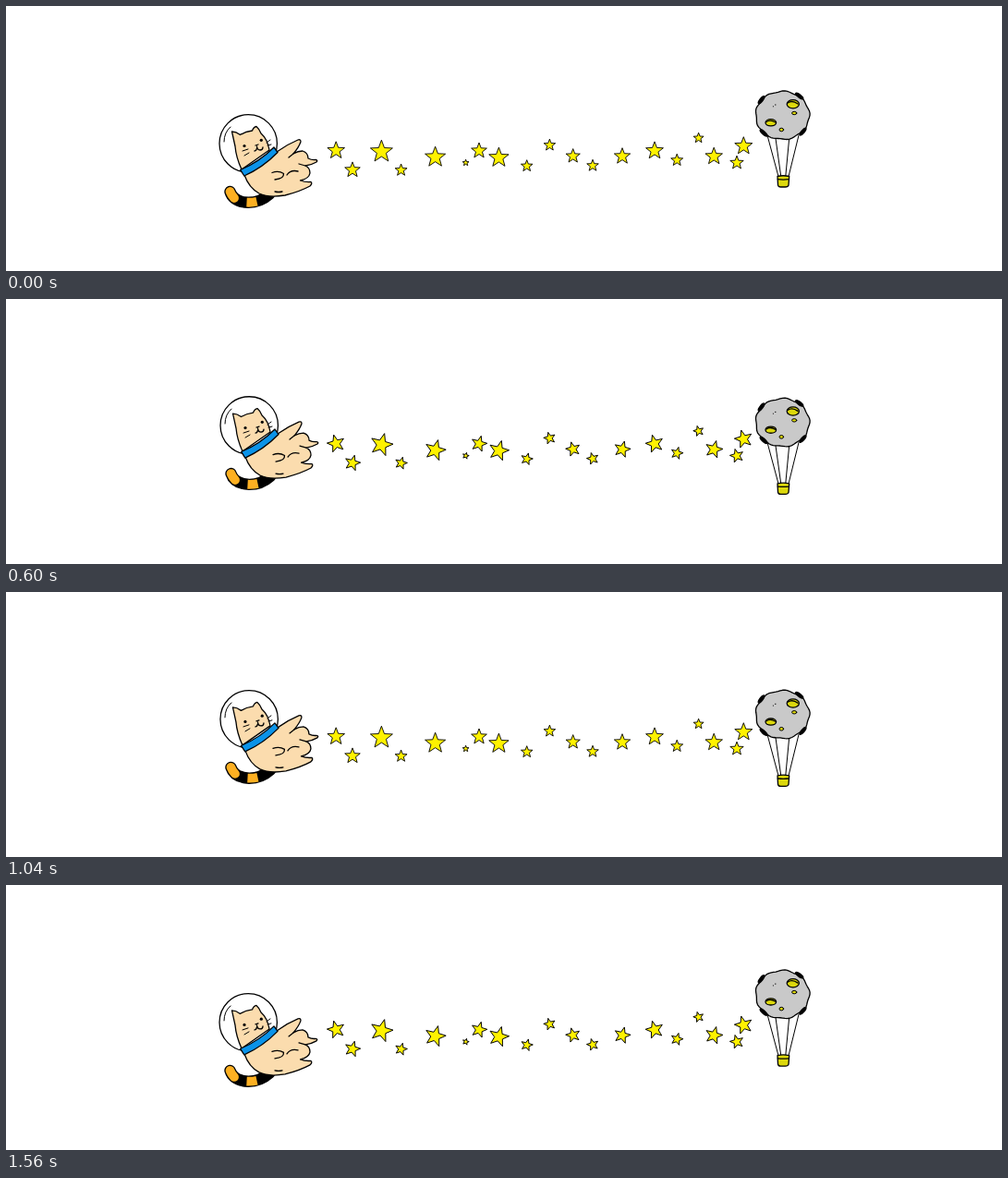
An HTML page that plays this animation: 1078x287 px, repeating every 1.6 s.

```html
<!DOCTYPE html>
<html lang="en">
<head>
<meta charset="utf-8">
<title>Space cat and moon balloon</title>
<style>
html, body { margin: 0; width: 100%; height: 100%; overflow: hidden; background: #fff; }
svg { display: block; width: 100%; height: 100%; }
#cat, #moon { fill: none; stroke: #000; stroke-width: 1.3; stroke-linecap: round; stroke-linejoin: round; }
#cat .fur { fill: #fbdcae; }
#cat .tail { stroke-width: 12.4; }
#cat .stripe { stroke: #fdb022; stroke-width: 9.8; }
#moon .gold { fill: #dcd80c; }
#moon .thin, #cat .thin { stroke-width: 1; }
#stars { fill: #fff200; stroke: #000; stroke-width: .9; }
.ink { fill: #000; }
</style>
</head>
<body>
<svg viewBox="0 0 1078 287">
  <g id="stars"></g>

  <g id="cat">
    <path class="tail" d="M242.5 201Q246 212 262 212.8Q275 213 285 204"/>
    <path class="stripe" d="M242.5 201Q244 205 247 208"/>
    <path class="stripe" style="stroke-linecap:butt" d="M260.5 212.7Q266 213 271.5 211.8"/>
    <circle cx="262.2" cy="148.9" r="31.2" fill="#fff"/>
    <path class="thin" d="M236 147Q236 137 243 131"/>
    <path class="fur" d="M255 177Q249 164 248 152L244.5 136Q249 136 253.5 139.5Q259 136 266.5 135Q268 131 271 130.5Q274 133 276 138Q283 144 285 156Z"/>
    <g class="ink" stroke="none">
      <circle cx="258" cy="151.5" r="1.6"/>
      <circle cx="276.3" cy="145.3" r="1.6"/>
    </g>
    <path d="M270 151L273 150M271.5 152Q272 156 275 156Q278 156 278 153M271.5 154Q271 157 269 157"/>
    <path class="thin" d="M256 157L262 155M258 162L263 159M282 148L286 145M283 151L287 150"/>
    <path class="fur" d="M258 183Q263 197 274 203Q284 208 302 205Q318 201 329 195Q332 192 330 190.5Q324 191 318.5 189Q328 187 329 181Q329 175 324 173Q331 172 336 169Q338 167 335 166.5Q331 167 327 165Q327 159 321 157Q316 157 311 160Q317 153 319 147Q319 144 316 145Q304 150 293 158Z"/>
    <path d="M288 180.5Q295 178 300.5 181.5Q301 187 291 188M304 183Q308 177 316 179M291 201Q295 202 299 201M311 160L306 164M324 173L317 171"/>
    <path fill="#0b93e8" d="M253.6 177.4Q274 169 290 153L294 158.5Q278 175 257.8 184Z"/>
  </g>

  <g id="moon">
    <path id="ropes" class="thin"/>
    <path class="gold" d="M835 184.5Q841 183 847.7 184.5L847 194Q846.5 196 843.5 196H838.5Q835.8 196 835.5 194Z"/>
    <path d="M835.3 187.7Q841 188.5 847.5 187.7"/>
    <path id="rock" fill="#c9c9c9"/>
    <g id="rims" class="ink"></g>
    <g class="gold">
      <ellipse cx="851.8" cy="106.2" rx="6.6" ry="4.6"/>
      <ellipse cx="827.8" cy="126.3" rx="5.8" ry="3.6"/>
      <ellipse class="thin" cx="853.2" cy="116" rx="2.6" ry="1.7"/>
      <ellipse class="thin" cx="839.3" cy="134" rx="2.3" ry="1.8"/>
    </g>
    <path d="M846 105Q851 101.5 857 106M823 125.5Q827 122.5 833 126"/>
    <path class="thin" d="M830.3 108.8h.2M832.5 107h.5"/>
  </g>
</svg>
<script>
const LOOP = 1600, STEP = 40, BEAT = 400, TILT = 15;

// x, y and radius of the stars, grouped by the way they tilt
const RIGHT = [
  [375, 177.6, 8.7], [406.4, 157.8, 12.6], [427.6, 177.8, 6.8], [464.6, 163.8, 11.6],
  [497.6, 169.8, 3.6], [512, 156.8, 8.8], [533.4, 164.3, 11.2], [563.7, 173.3, 6.6],
  [667, 162.8, 9.1], [726.2, 167, 6.8], [766.2, 162.9, 9.7]
];
const LEFT = [
  [357.2, 156.6, 9.8], [588.4, 150.7, 6.6], [613.7, 162.6, 8], [635, 172.9, 6.6],
  [702, 156.8, 9.9], [749.6, 143, 5.8], [791, 169.8, 7.6], [798.3, 151.7, 10]
];

const $ = id => document.getElementById(id);
const rad = deg => deg * Math.PI / 180;

function add(parent, tag, attrs) {
  const node = document.createElementNS("http://www.w3.org/2000/svg", tag);
  for (const key in attrs) node.setAttribute(key, attrs[key]);
  return parent.appendChild(node);
}

// Closed ring of points; size(i) scales each one
function ring(count, size, turn = 0) {
  return Array.from({ length: count }, (_, i) => {
    const a = rad(i * 360 / count + turn);
    return [size(i) * Math.cos(a), size(i) * Math.sin(a)];
  });
}

function makeStar([x, y, r], dir) {
  const points = ring(10, i => i % 2 ? r * 0.42 : r, -90).join(" ");
  return { node: add($("stars"), "polygon", { points }), x, y, dir };
}

const stars = [
  ...RIGHT.map(s => makeStar(s, 1)),
  ...LEFT.map(s => makeStar(s, -1))
];

function buildMoon() {
  const onMoon = ([x, y]) => [840.5 + 29 * x, 118.4 + 26 * y];
  const bumpy = ring(72, i => 1 + 0.025 * Math.cos(rad(i * 45 + 40)));
  $("rock").setAttribute("d", "M" + bumpy.map(onMoon).join("L") + "Z");

  for (const a of [-52, -141, 134, 42]) {
    const [x, y] = onMoon([1.02 * Math.cos(rad(a)), 1.02 * Math.sin(rad(a))]);
    add($("rims"), "ellipse", { rx: 5, ry: 1.6, transform: `translate(${x} ${y}) rotate(${a + 90})` });
  }

  const ropes = [-17, -8.5, 7, 17].map(x => `M${841 + x} 140L${841.5 + x / 3} 184`);
  $("ropes").setAttribute("d", ropes.join(""));
}

const move = (node, x, y, turn = 0) =>
  node.setAttribute("transform", `translate(${x} ${y}) rotate(${turn})`);

function draw(ms) {
  const t = Math.floor((ms % LOOP) / STEP) * STEP;
  const swing = 1 - Math.cos(2 * Math.PI * t / LOOP);
  move($("cat"), 0.6 * swing, -7 * swing);
  move($("moon"), 0, 9 * swing);
  const turn = Math.floor(t / BEAT) % 2 ? TILT : 0;
  for (const s of stars) move(s.node, s.x, s.y, s.dir * turn);
}

buildMoon();
const start = performance.now();
function tick() {
  draw(performance.now() - start);
  requestAnimationFrame(tick);
}
tick();
</script>
</body>
</html>
```
